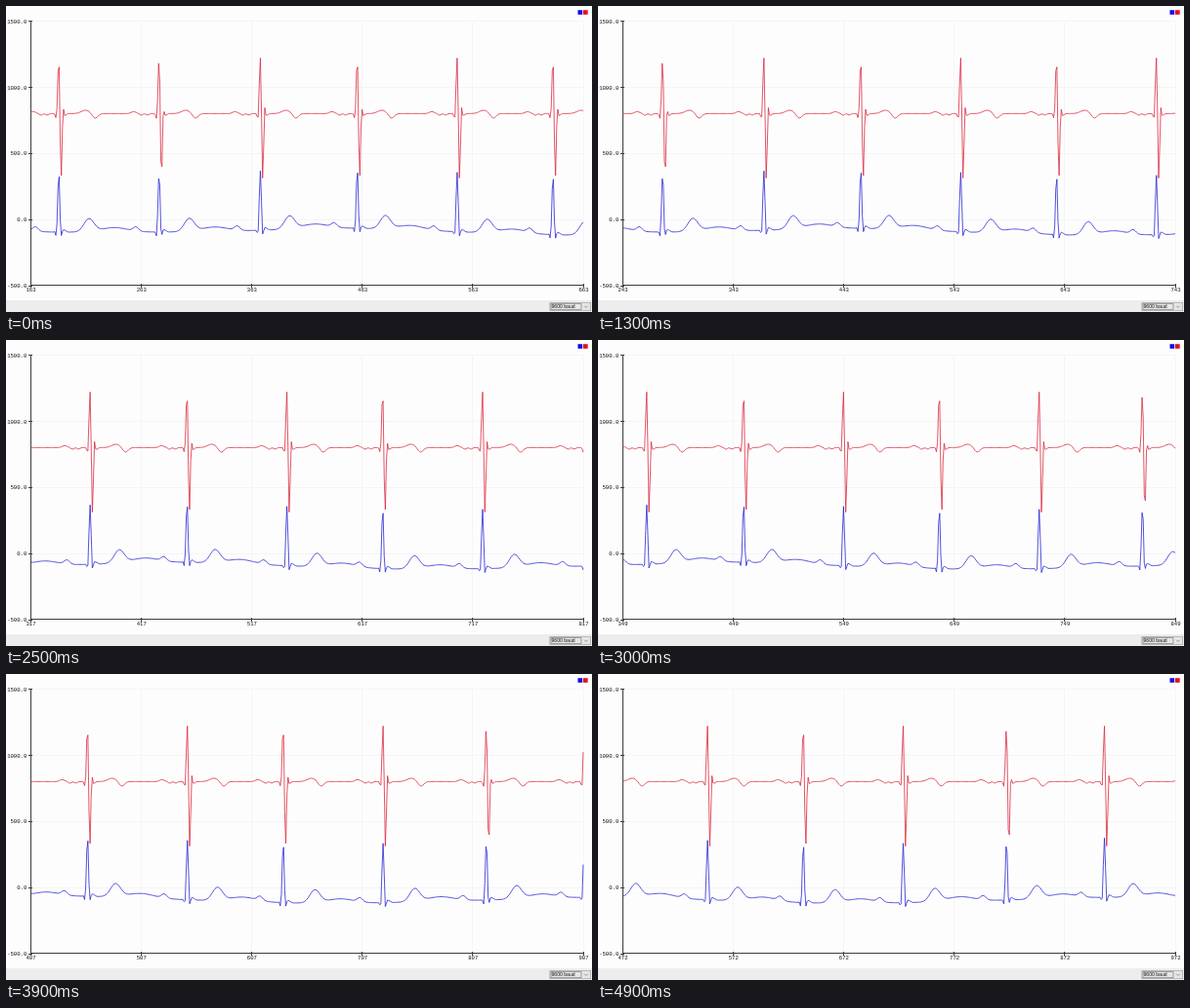
Recreate the animation shown at these times as an HTML page with a canvas. Size 600x314 px, loop 5000 ms.

```html
<!DOCTYPE html>
<html lang="en">
<head>
<meta charset="utf-8">
<title>Serial plot</title>
<style>
  html, body { margin: 0; width: 100%; height: 100%; overflow: hidden; background: #fefdfe; }
  canvas { display: block; width: 600px; height: 314px; }
</style>
</head>
<body>
<canvas id="stage"></canvas>
<script>
const W = 600, H = 314, LOOP = 5000, STEP = 100;
const LEFT = 25, RIGHT = 591, TOP = 15.5, BOTTOM = 287, SPAN = 500;
const PX = (RIGHT - LEFT) / SPAN;
const RED = '#da2a3e', BLUE = '#2828d2', GRID = '#f5f4f6', AXIS = '#3c3c3c';

const canvas = document.getElementById('stage');
const ctx = canvas.getContext('2d');
const dpr = window.devicePixelRatio || 1;
canvas.width = W * dpr;
canvas.height = H * dpr;
ctx.scale(dpr, dpr);

// Time to first visible sample
const scroll = [[0, 163], [500, 192], [1300, 243], [2500, 317], [3400, 375], [4300, 432], [4900, 472]];

// Position of each heartbeat, in samples; fractions shape the sampled peaks
const beats = [98, 188.65, 279.4, 371, 458.65, 549, 635.65, 726, 819.4, 908, 998];

// Spikes as [sample offset, height], joined by eased curves
const redSpike = [[-4, 0], [-2.2, 5], [0, -57], [2.1, 67], [4, -6], [5.2, 2], [9, 0]];
const blueSpike = [[-4, -1], [-2.3, 4], [0.05, -61], [2, 4], [4, -2.5], [9, 0]];

const bell = (x, mid, width) => Math.exp(-(((x - mid) / width) ** 2) / 2);
const linear = u => u;
const smooth = u => u * u * (3 - 2 * u);

function along(points, x, ease) {
  const i = points.findIndex(p => p[0] >= x);
  if (i < 1) return i === 0 ? points[0][1] : points[points.length - 1][1];
  const [x0, y0] = points[i - 1], [x1, y1] = points[i];
  return y0 + (y1 - y0) * ease((x - x0) / (x1 - x0));
}

function spike(points, u) {
  return u > points[0][0] && u < 9 ? along(points, u, smooth) : 0;
}

// Slow drift of the blue resting line
const drift = s => 232 - 4 * bell(s, 445, 60) + 3.3 * bell(s, 681, 70) - 3 * bell(s, 930, 60);

// The late wave comes sooner where the resting line is high
const lag = beat => 27.3 + 0.5 * (drift(beat) - 232);

function redBeat(u, late) {
  return spike(redSpike, u)
    - 2 * bell(u, -23, 2.2) + 1.7 * bell(u, -16, 1.3) + 1.5 * bell(u, -10.5, 1.3)
    - 3.4 * bell(u, late - 3, 4) + 4.9 * bell(u, late + 5.5, 2.5);
}

function blueBeat(u, late) {
  return spike(blueSpike, u)
    - 4.2 * bell(u, -21, 2.4)
    - 13.2 * bell(u, late, 4.5) - 4.6 * bell(u, late + 23, 12);
}

const sum = (beatWave, s) => beats.reduce((y, b) => y + beatWave(s - b, lag(b)), 0);
const redAt = s => 110.4 + sum(redBeat, s);
const blueAt = s => drift(s) + sum(blueBeat, s);

function rect(x, y, w, h, color) {
  ctx.fillStyle = color;
  ctx.fillRect(x, y, w, h);
}

function text(str, x, y, font, align) {
  ctx.font = font;
  ctx.textAlign = align;
  ctx.textBaseline = 'middle';
  ctx.fillStyle = '#111';
  ctx.fillText(str, x, y);
}

function trace(wave, start, color) {
  ctx.beginPath();
  for (let i = 0; i <= SPAN; i++) ctx.lineTo(LEFT + i * PX, wave(start + i));
  ctx.strokeStyle = color;
  ctx.lineWidth = 0.8;
  ctx.lineJoin = 'round';
  ctx.stroke();
}

function drawGrid(start) {
  const font = '5.6px "Liberation Mono", "DejaVu Sans Mono", monospace';
  for (let i = 0; i < 5; i++) {
    const y = TOP + (BOTTOM - TOP) * i / 4;
    if (i < 4) rect(LEFT, Math.floor(y), RIGHT - LEFT, 1, GRID);
    rect(23, Math.floor(y), 4, 1, AXIS);
    text((1500 - 500 * i).toFixed(1), 21.3, y + 0.7, font, 'right');
  }
  for (let i = 0; i <= 5; i++) {
    const x = LEFT + (RIGHT - LEFT) * i / 5;
    if (i) rect(Math.floor(x), 15, 1, 271, GRID);
    rect(Math.floor(x), 285, 1, 4, AXIS);
    text(String(start + 100 * i), x + 0.5, 291.7, font, 'center');
  }
  rect(25, 15, 1, 272, AXIS);
  rect(25, 286, 566, 1, AXIS);
}

function drawBar() {
  rect(0, 302, W, 12, '#eeedee');
  rect(556.5, 304, 42.5, 9, '#a4a4a4');
  rect(557.2, 304.7, 41.1, 7.6, '#e6e6e6');
  ctx.strokeStyle = '#666';
  ctx.lineWidth = 0.6;
  ctx.strokeRect(558, 305.4, 31, 6.2);
  text('9600 baud', 558.5, 308.7, '5.1px "Liberation Sans", Arial, sans-serif', 'left');
  ctx.beginPath();
  ctx.moveTo(592.2, 307.7);
  ctx.lineTo(594, 309.5);
  ctx.lineTo(595.8, 307.7);
  ctx.stroke();
}

function draw(t) {
  const start = Math.round(along(scroll, t, linear));
  rect(0, 0, W, H, '#fefdfe');
  drawGrid(start);
  trace(blueAt, start, BLUE);
  trace(redAt, start, RED);
  rect(585.5, 4.2, 4.7, 4.6, '#1010e8');
  rect(591, 4.2, 4.7, 4.6, '#e8101c');
  drawBar();
}

const begin = performance.now();
function tick() {
  const t = (performance.now() - begin) % LOOP;
  draw(Math.floor(t / STEP) * STEP);
  requestAnimationFrame(tick);
}
tick();
</script>
</body>
</html>
```
